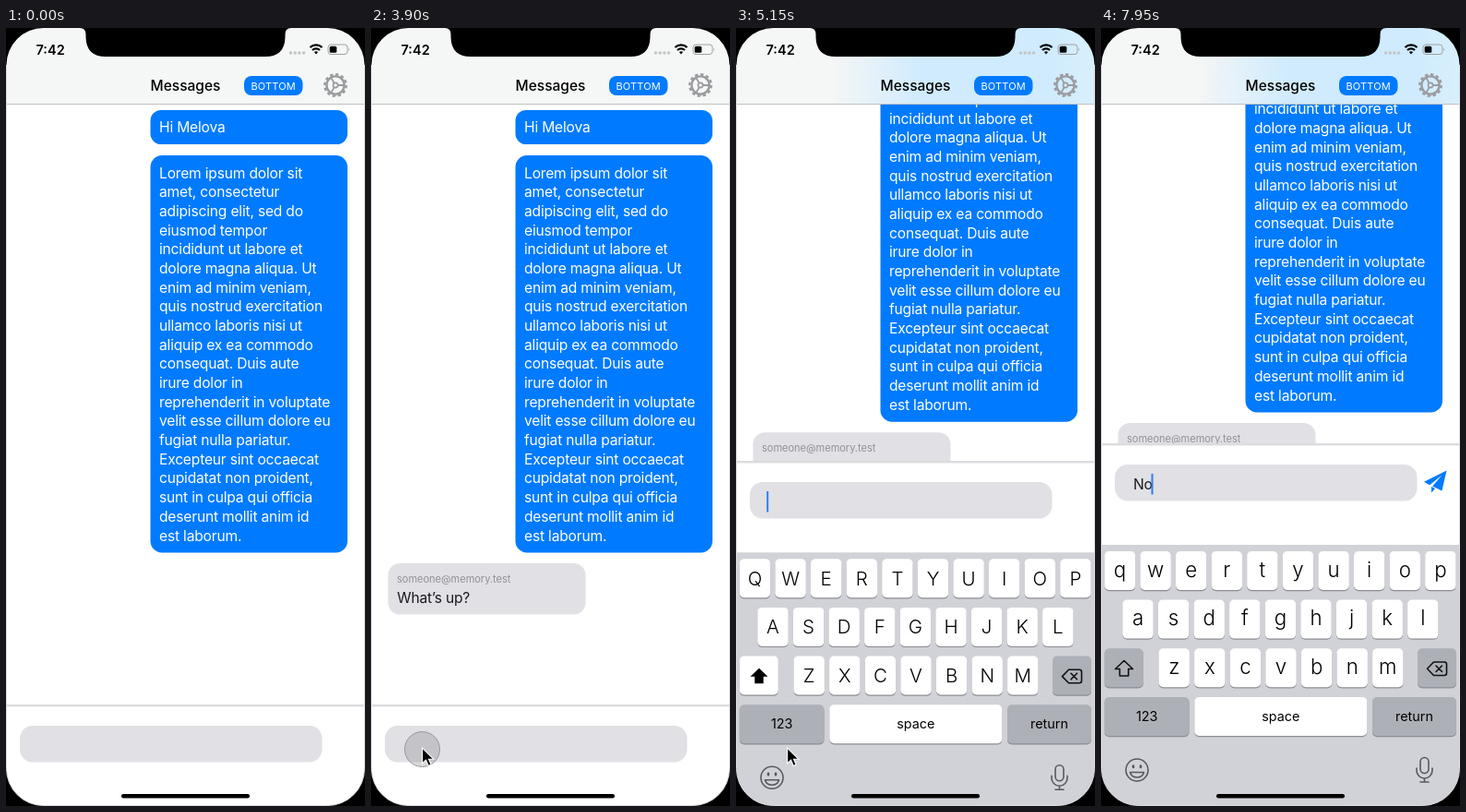
These frames come from a looping animation (389 by 843 pixels, 8 s). An HTML page:

```html
<!DOCTYPE html>
<html lang="en">
<head>
<meta charset="utf-8">
<title>Chat</title>
<style>
html, body { margin: 0; width: 100%; height: 100%; overflow: hidden; background: #fff; }
svg { display: block; width: 100%; height: 100%; font-family: Inter, "Noto Sans", sans-serif; }
.body { font-size: 15.6px; letter-spacing: -.19px; }
.upper { font-size: 20.5px; font-weight: 350; text-anchor: middle; }
.lower { font-size: 22.3px; font-weight: 350; text-anchor: middle; }
.label { font-size: 14.4px; text-anchor: middle; }
.icon { fill: none; stroke: #565a60; stroke-width: 1.6; stroke-linecap: round; stroke-linejoin: round; }
.dark { stroke: #111; }
</style>
</head>
<body>
<svg viewBox="0 0 389 843" xmlns="http://www.w3.org/2000/svg">
  <defs>
    <linearGradient id="tintFill">
      <stop offset=".27" stop-color="#cfebfd" stop-opacity="0"/>
      <stop offset=".52" stop-color="#cfebfd"/>
      <stop offset=".88" stop-color="#cfebfd"/>
      <stop offset="1" stop-color="#d9f0fb"/>
    </linearGradient>
  </defs>
  <rect width="389" height="843" fill="#fff"/>

  <g id="chat" class="body">
    <rect x="156.5" y="89" width="213.5" height="37" rx="11.5" fill="#007aff"/>
    <text x="166" y="113" fill="#fff">Hi Melova</text>
    <rect x="156.5" y="138" width="213.5" height="430.5" rx="12.5" fill="#007aff"/>
    <g id="lorem" fill="#fff"></g>
    <g id="reply">
      <rect x="18.5" y="580" width="214" height="55.5" rx="13" fill="#e0e0e5"/>
      <text x="28" y="600.5" fill="#919196" font-size="11" letter-spacing="0">someone@memory.test</text>
      <text x="28.3" y="622.5" fill="#1b1b1d">What’s up?</text>
    </g>
  </g>

  <g id="bar">
    <rect y="734" width="389" height="400" fill="#fff"/>
    <rect y="733" width="389" height="2.4" fill="#dcdcdf"/>
    <rect x="15" y="756" width="327.5" height="39.5" rx="14" fill="#e0e0e5"/>
    <text id="draft" class="body" x="35" y="783" fill="#1b1b1d"></text>
    <rect id="caret" y="766" width="2" height="22.5" fill="#2f7df0"/>
    <path id="send" fill="#007aff" d="M374.5 762.5 350 774.8l6.2 3.4 13.2-10.8-10.2 12.2 10.2 4.9zM358 780v6.5l4-4.4z"/>
  </g>

  <g id="keyboard">
    <rect y="560" width="389" height="290" fill="#d1d2d7"/>
    <g id="keys"></g>
    <g id="upper"></g>
    <g id="lower"></g>
    <path class="icon dark" d="M360.5 687H372q2.5 0 2.5 2.5v9.5q0 2.5-2.5 2.5H360.5L353.5 694.3ZM363 691l6.5 6.5m0-6.5l-6.5 6.5"/>
    <g class="icon">
      <circle cx="39" cy="804" r="12"/>
      <path d="M31.5 806.5h15q-1.5 5.5-7.5 5.5t-7.5-5.5z"/>
      <path d="M35 799.5v1.5m8-1.5v1.5" stroke-width="2.6"/>
      <rect x="346" y="790.5" width="9" height="17" rx="4.5"/>
      <path d="M342 802v2.5a8.5 8.5 0 0 0 17 0V802m-8.5 11v4m-4.5 0h9"/>
    </g>
  </g>

  <g id="header">
    <rect width="389" height="83" fill="#f5f6f6"/>
    <rect id="tint" width="389" height="82" fill="url(#tintFill)"/>
    <rect y="82" width="389" height="1" fill="#bfc0c2"/>
    <text x="194.5" y="67.7" font-size="15.5" font-weight="500" text-anchor="middle">Messages</text>
    <rect x="258" y="52" width="63.5" height="21" rx="8" fill="#007aff"/>
    <text x="289.7" y="66.5" font-size="11" letter-spacing=".15" text-anchor="middle" fill="#fff">BOTTOM</text>
    <g transform="translate(357 62)" fill="none" stroke="#9b9b9f">
      <circle r="11.7" stroke-width="2.4" pathLength="24" stroke-dasharray="1.1 .9"/>
      <circle r="9.6" stroke-width="2.4"/>
      <circle r="2.6" stroke-width="1.6"/>
      <path d="M2.7 0H9M-1.4-2.4-4.5-7.8M-1.4 2.4-4.5 7.8" stroke-width="1.8"/>
    </g>
    <text x="32.5" y="28.6" font-size="14.5" font-weight="600">7:42</text>
    <g fill="#c3c4c6">
      <circle cx="308.5" cy="27" r="1.7"/><circle cx="313.2" cy="27" r="1.7"/>
      <circle cx="317.9" cy="27" r="1.7"/><circle cx="322.6" cy="27" r="1.7"/>
    </g>
    <g fill="none" stroke="#000" stroke-width="2.3">
      <path d="M329.5 21a9.2 9.2 0 0 1 13 0M332 24a5.7 5.7 0 0 1 8 0"/>
      <path d="M336 28.5l-2.1-2.4q2.1-1.7 4.2 0z" fill="#000" stroke="none"/>
    </g>
    <rect x="349" y="18" width="21" height="10.5" rx="3" fill="none" stroke="#a0a1a3"/>
    <rect x="350.7" y="19.7" width="7.6" height="7.1" rx="1.5"/>
    <path d="M371.5 21.3q1.8 1.9 0 3.9z" fill="#a0a1a3"/>
  </g>

  <path d="M0 0H389V843H0ZM40.5 0A40 40 0 0 0 .5 40V802.5A40 40 0 0 0 40.5 842.5H348.5A40 40 0 0 0 388.5 802.5V40A40 40 0 0 0 348.5 0Z" fill-rule="evenodd"/>
  <path d="M.5 40V802.5A40 40 0 0 0 40.5 842.5H348.5A40 40 0 0 0 388.5 802.5V40" fill="none" stroke="#dcdcde"/>
  <path d="M80 0Q86.5 0 86.5 7V10Q87 31 108 31H281Q302 31 302.5 10V7Q302.5 0 309 0Z"/>
  <rect x="125" y="830" width="139" height="4.5" rx="2.2"/>

  <circle id="touch" cx="55.5" cy="781.5" r="19" fill="#808084" fill-opacity=".3" stroke="#98989c"/>
  <path id="pointer" d="M55.6 780v17l3.9-3.7 2.7 6.2 3-1.3-2.7-6h5.3z" stroke="#fff" stroke-width="1.1"/>
</svg>
<script>
const LOOP = 8000;
const byId = id => document.getElementById(id);

function add(parent, tag, attrs, text = '') {
  const node = document.createElementNS('http://www.w3.org/2000/svg', tag);
  for (const name in attrs) node.setAttribute(name, attrs[name]);
  node.textContent = text;
  byId(parent).append(node);
}

const lorem = `Lorem ipsum dolor sit
amet, consectetur
adipiscing elit, sed do
eiusmod tempor
incididunt ut labore et
dolore magna aliqua. Ut
enim ad minim veniam,
quis nostrud exercitation
ullamco laboris nisi ut
aliquip ex ea commodo
consequat. Duis aute
irure dolor in
reprehenderit in voluptate
velit esse cillum dolore eu
fugiat nulla pariatur.
Excepteur sint occaecat
cupidatat non proident,
sunt in culpa qui officia
deserunt mollit anim id
est laborum.`;
lorem.split('\n').forEach((line, i) => add('lorem', 'text', { x: 166, y: 162.6 + i * 20.68 }, line));

const WHITE = '#fff', GREY = '#adb0b6';
function key(parent, x, y, width, fill) {
  add(parent, 'rect', { x, y: y + 1.2, width, height: 42, rx: 5, fill: '#8b8d92' });
  add(parent, 'rect', { x, y, width, height: 42, rx: 5, fill });
}

['QWERTYUIOP', 'ASDFGHJKL', 'ZXCVBNM'].forEach((row, r) => {
  const left = [3.8, 23.3, 62.5][r], top = 567 + r * 52.6;
  [...row].forEach((letter, i) => {
    const x = left + i * 38.6;
    key('keys', x, top, 33.4, WHITE);
    add('upper', 'text', { class: 'upper', x: x + 16.7, y: top + 28.5 }, letter);
    add('lower', 'text', { class: 'lower', x: x + 16.7, y: top + 27.5 }, letter.toLowerCase());
  });
});
key('keys', 343, 672.2, 42, GREY);
[[3.8, 91.7, '123', GREY], [101.3, 187, 'space', WHITE], [294, 91, 'return', GREY]].forEach(([x, width, text, fill]) => {
  key('keys', x, 725, width, fill);
  add('keys', 'text', { class: 'label', x: x + width / 2, y: 750.5 }, text);
});
const shiftArrow = 'M25 685.5L34.5 694.5H29.7V702H20.3V694.5H15.5Z';
key('upper', 3.8, 672.2, 42, WHITE);
add('upper', 'path', { d: shiftArrow });
key('lower', 3.8, 672.2, 42, GREY);
add('lower', 'path', { d: shiftArrow, class: 'icon dark' });

const clamp = v => Math.min(1, Math.max(0, v));
// Critically damped spring from 0 to 1; rate is per second.
function spring(ms, rate) {
  const x = Math.max(0, ms) / 1000 * rate;
  return 1 - (1 + x) * Math.exp(-x);
}
const show = (id, on) => { byId(id).style.display = on ? '' : 'none'; };
const shift = (id, y) => byId(id).setAttribute('transform', `translate(0 ${y.toFixed(2)})`);

function blink(ms) {
  const phase = ms % 1000 / 1000;
  return phase < .75 ? clamp((.75 - phase) / .2) : clamp((phase - .85) / .15);
}

function draw(t) {
  const keyboardUp = spring(t - 4872, 19.3), barUp = spring(t - 4882, 16.3);
  shift('keyboard', 283 * (1 - keyboardUp));
  shift('bar', -283 * barUp);
  shift('chat', -152 * barUp);
  byId('tint').setAttribute('opacity', clamp((152 * barUp - 6) / 50));
  show('reply', t >= 2100);

  const draft = 'No'.slice(0, (t >= 7500) + (t >= 7750));
  byId('draft').textContent = draft;
  show('send', draft);
  show('upper', !draft);
  show('lower', draft);
  show('caret', t >= 4850);
  byId('caret').setAttribute('x', [33.2, 46, 54.5][draft.length]);
  byId('caret').setAttribute('opacity', draft ? 1 : blink(t - 4850));

  const enter = clamp((t - 3400) / 300), leave = clamp((t - 5450) / 300);
  shift('pointer', 66 * ((1 - enter) ** 2 + leave ** 2));
  show('pointer', enter > 0 && leave < 1);
  show('touch', t >= 3800 && t < 4050);
}

const start = performance.now();
function tick() {
  draw((performance.now() - start) % LOOP);
  requestAnimationFrame(tick);
}
tick();
</script>
</body>
</html>
```
